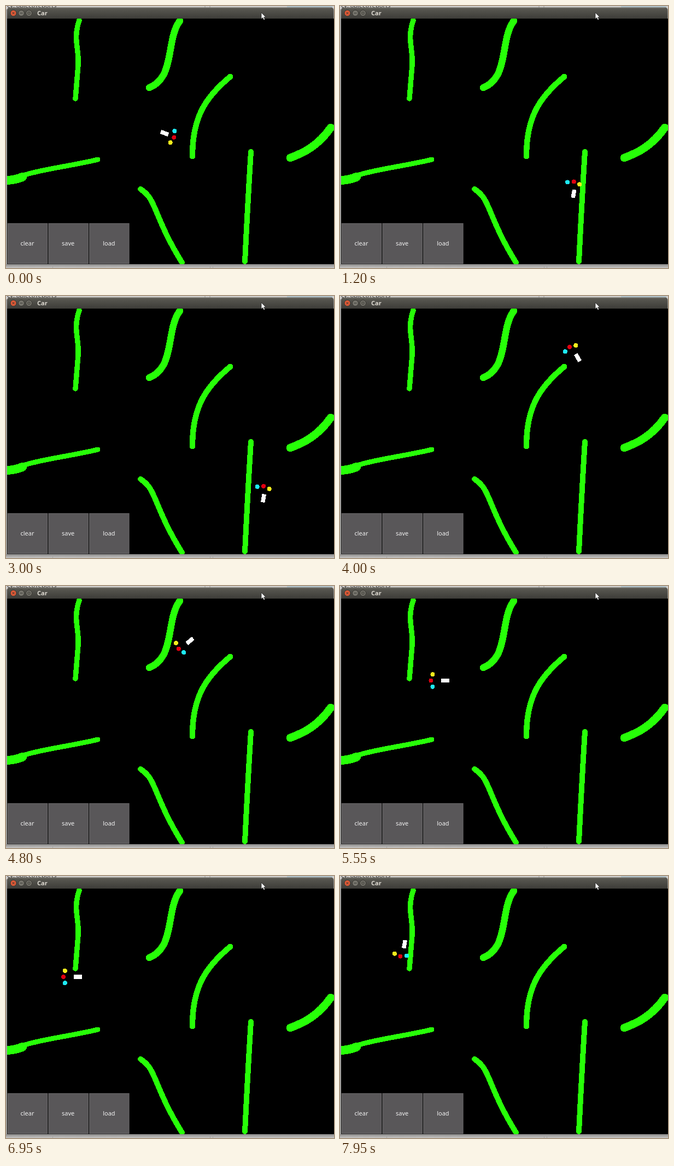
Write an HTML page that moves like this. It is 600x478 px and loops after 8000 ms.

```html
<!DOCTYPE html>
<html lang="en">
<head>
<meta charset="utf-8">
<title>Car</title>
<style>
html, body { margin: 0; width: 100%; height: 100%; overflow: hidden; background: #d6d5d3; }
svg { display: block; width: 100vw; height: 100vh; }
text { font: 11px "Noto Sans", "Open Sans", sans-serif; fill: #f2f2f2; }
.title { font-weight: 700; fill: #dfdbd2; }
.page { fill: #333; }
.crisp { shape-rendering: crispEdges; }
</style>
</head>
<body>
<svg viewBox="0 0 600 478">
  <defs>
    <linearGradient id="bar" x2="0" y2="1">
      <stop offset="0" stop-color="#5c5b54"/>
      <stop offset="1" stop-color="#3d3c38"/>
    </linearGradient>
    <linearGradient id="shade" x2="0" y2="1">
      <stop offset="0" stop-color="#8b8a89"/>
      <stop offset="1" stop-color="#c6c5c4"/>
    </linearGradient>
    <clipPath id="field"><rect x="2" y="23" width="598" height="448"/></clipPath>
  </defs>

  <rect width="600" height="478" fill="#d0cfcd"/>
  <text class="page" x="2" y="3">cy: object/reports</text>
  <path d="M364 0V3M373 0V3" stroke="#999"/>
  <path d="M514 1.500H597" stroke="#8fb3c6"/>
  <rect y="6" width="2" height="466" fill="#a3a2a0"/>
  <rect y="471" width="600" height="7" fill="url(#shade)"/>
  <path d="M85.500 473V478M373.500 473V478M378.500 473V478" stroke="#a5a4a3"/>

  <path d="M2 23V8Q2 2.500 8 2.500H594Q599.500 2.500 599.500 8V23Z" fill="url(#bar)"/>
  <path d="M7 3.500H594" stroke="#74736b"/>
  <g stroke="#35342f">
    <circle cx="13.500" cy="13" r="5.500" fill="#e05a37"/>
    <circle cx="28" cy="13" r="5.500" fill="#77756d"/>
    <circle cx="42" cy="13" r="5.500" fill="#77756d"/>
    <path d="M11.500 11L15.500 15M15.500 11L11.500 15M25.500 13H30.500M40 11H44V15H40Z" fill="none"/>
  </g>
  <text class="title" x="57" y="17">Car</text>

  <rect x="2" y="23" width="598" height="448"/>
  <g clip-path="url(#field)">
    <g id="walls" class="crisp" fill="none" stroke="#27ff08" stroke-linecap="round"></g>
    <rect id="car" class="crisp" x="-7.500" y="-3.750" width="15" height="7.500" fill="#fff"/>
    <g id="sensors" class="crisp"></g>
    <g id="buttons"></g>
  </g>
  <path d="M467 12V23.500L469.600 21.200L471.600 25.400L473.600 24.500L471.700 20.400H475.200Z" fill="#fff" stroke="#222" stroke-width=".8"/>
</svg>
<script>
const LOOP = 8000, STEP = 50;
const SPEED = .27, TURN = 20;     // px per ms, degrees per steering step
const REACH = 22.4, OFFSET = -3.7; // sensor distance and its shift from the car's centre
const rad = Math.PI / 180;
const $ = id => document.getElementById(id);

function add(parent, tag, attrs, text) {
  const el = document.createElementNS(parent.namespaceURI, tag);
  for (const k in attrs) el.setAttribute(k, attrs[k]);
  if (text) el.textContent = text;
  parent.appendChild(el);
  return el;
}

const wall = (width, d) => add($("walls"), "path", { d, "stroke-width": width });
wall(9.5, "M134 26C122 62 134 76 132 108L127 169");
wall(12.5, "M318 27C292 62 310 130 262 149");
wall(10.5, "M410 129C367 165 341 200 341 274");
wall(14.5, "M594 222C570 256 544 268 520 277");
wall(9, "M168 280C130 290 70 297 35 308");
wall(16, "M30 312Q15 318 0 318");
wall(10, "M246 334C276 352 270 385 322 468");
wall(10, "M448 266Q443 345 437 466");

["clear", "save", "load"].forEach((label, i) => {
  const x = 3 + i * 74.7;
  add($("buttons"), "rect", { x: x - .5, y: 396, width: 74, height: 75, fill: "#2b2b2b" });
  add($("buttons"), "rect", { x: x + .5, y: 397, width: 72, height: 72.5, fill: "#595759", stroke: "#6b696b" });
  add($("buttons"), "text", { x: x + 36, y: 437, "text-anchor": "middle" }, label);
});

const sensors = [[0, "#e00010"], [30, "#1de9f5"], [-30, "#f5ee1c"]].map(([turn, fill]) =>
  ({ turn, el: add($("sensors"), "circle", { r: 4, fill }) }));

const stop = (t, x, y, heading) => ({
  t, x, y,
  vx: SPEED * Math.cos(heading * rad),
  vy: -SPEED * Math.sin(heading * rad)
});
const route = [
  stop(0, 290, 232, -20),
  stop(1200, 427.5, 342.5, 80),
  stop(1700, 472, 254, -20),
  stop(2400, 568, 352, -120),
  stop(3000, 471, 369, 80),
  stop(4000, 435, 112.5, 120),
  stop(5550, 192.5, 172.5, 180),
  stop(6250, 168, 48, 140),
  stop(6950, 131, 184, 180),
  stop(7650, 95, 93, 60),
  stop(7950, 118, 124.5, -100)
];

// value and slope of a cubic from a to b with end slopes va and vb
function cubic(u, a, b, va, vb) {
  const c2 = 3 * (b - a) - 2 * va - vb, c3 = 2 * (a - b) + va + vb;
  return [a + u * (va + u * (c2 + u * c3)), va + u * (2 * c2 + 3 * u * c3)];
}

function pose(time) {
  const next = Math.max(1, route.findIndex(s => s.t >= time));
  const a = route[next - 1], b = route[next];
  const span = b.t - a.t, u = (time - a.t) / span;
  const [x, dx] = cubic(u, a.x, b.x, a.vx * span, b.vx * span);
  const [y, dy] = cubic(u, a.y, b.y, a.vy * span, b.vy * span);
  return { x, y, heading: Math.round(Math.atan2(-dy, dx) / rad / TURN) * TURN };
}

function draw(ms) {
  const { x, y, heading } = pose(Math.floor(ms % LOOP / STEP) * STEP);
  $("car").setAttribute("transform", `translate(${x} ${y}) rotate(${-heading})`);
  for (const { turn, el } of sensors) {
    const a = (heading + turn) * rad;
    el.setAttribute("cx", x + OFFSET + REACH * Math.cos(a));
    el.setAttribute("cy", y - REACH * Math.sin(a));
  }
}

let start;
function tick(now) {
  start ??= now;
  draw(now - start);
  requestAnimationFrame(tick);
}
draw(0);
requestAnimationFrame(tick);
</script>
</body>
</html>
```
